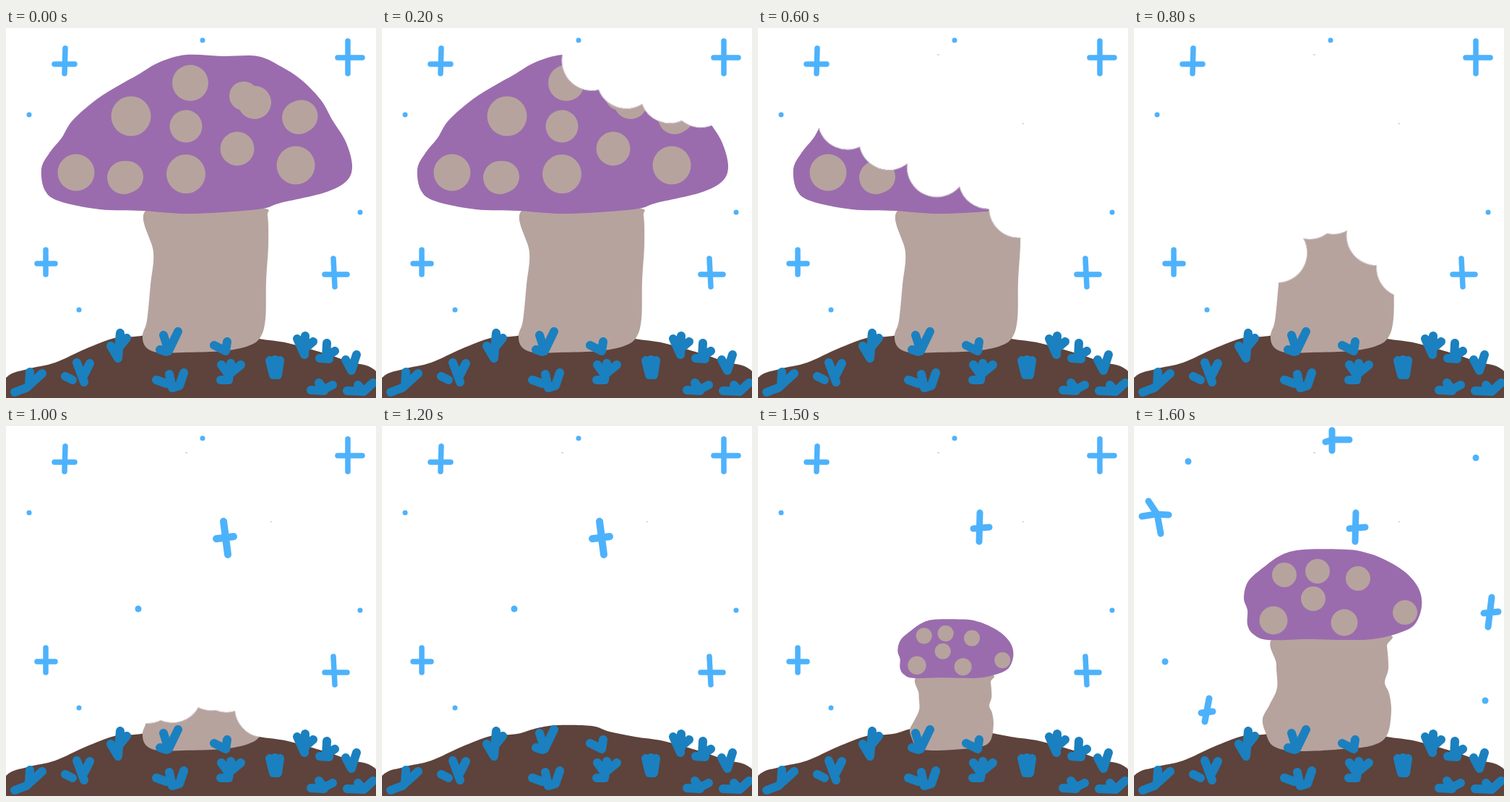
Write an HTML page that moves like this. It is 512x512 px and loops after 1.7 s.

```html
<!DOCTYPE html>
<html lang="en">
<head>
<meta charset="utf-8">
<title>Mushroom</title>
<style>
html, body { margin: 0; width: 100%; height: 100%; overflow: hidden; background: #fff; }
svg { display: block; width: 100vw; height: 100vh; }
.star { stroke: #4db2fc; fill: none; stroke-linecap: round; stroke-linejoin: round; }
.grass { stroke: #1b80bf; fill: none; stroke-width: 12; stroke-linecap: round; stroke-linejoin: round; }
</style>
</head>
<body>
<svg id="stage" viewBox="0 0 512 512">
  <defs><clipPath id="left"><path id="keep"/></clipPath></defs>
</svg>
<script>
const STEP = 100, COUNT = 17;
const CAP = '#9a6cad', FLESH = '#b6a39e', SOIL = '#5d433b';
const stage = document.getElementById('stage');
const keep = document.getElementById('keep');

function add(parent, tag, attrs = {}) {
  const el = document.createElementNS('http://www.w3.org/2000/svg', tag);
  for (const k in attrs) el.setAttribute(k, attrs[k]);
  return parent.appendChild(el);
}

// Smooth closed outline through "x,y x,y ..."
function blob(text) {
  const p = text.split(' ').map(s => s.split(',').map(Number));
  const n = p.length, at = i => p[(i + n) % n];
  let d = 'M' + p[0];
  for (let i = 0; i < n; i++) {
    const [a, b, c, e] = [at(i - 1), at(i), at(i + 1), at(i + 2)];
    const c1 = b.map((v, k) => v + (c[k] - a[k]) / 6);
    const c2 = c.map((v, k) => v - (e[k] - b[k]) / 6);
    d += `C${c1} ${c2} ${c}`;
  }
  return d + 'Z';
}

function mushroom(parent, stem, cap, spots, transform = '') {
  const g = add(parent, 'g', { transform });
  add(g, 'path', { d: blob(stem), fill: FLESH });
  add(g, 'path', { d: blob(cap), fill: CAP });
  for (const [cx, cy, r] of spots) add(g, 'circle', { cx, cy, r, fill: FLESH });
  return g;
}

function stars(lines, dots, width, r) {
  const g = add(stage, 'g', { class: 'star', 'stroke-width': width });
  add(g, 'path', { d: lines });
  for (const [cx, cy] of dots) add(g, 'circle', { cx, cy, r, fill: '#4db2fc', stroke: 'none' });
  return g;
}

// Sky
const sky = {
  a: stars('M82 28L81 63M67 50H95M473 18V63M459 41H493M55 307V341M43 326H68M453 319L455 358M441 341H472',
    [[272, 17], [32, 120], [490, 255], [101, 390]], 7.5, 3.5),
  b: stars('M276 6V39M272 18L276 15M255 27L284 30H317M30 107L26 115V149M13 129L37 130M28 119H31M487 237L486 273M472 256H492L507 262M101 373L106 400M89 397L118 392',
    [[35, 41], [473, 55], [39, 320], [473, 374]], 9.5, 4.6),
  c: stars('M274 6V34M265 22L275 19H298M20 104L32 122L37 149M11 125L30 122L48 123M495 237L490 278M484 259L504 257M104 377L98 409M93 397L109 395',
    [[75, 49], [473, 44], [43, 326], [486, 380]], 9, 4.5),
  x: stars('M301 132L307 178M291 156L315 153', [[183, 253]], 10, 4.5),
  y: stars('M291 128L288 166M277 146H303', [[190, 225]], 9.5, 4.5),
  z: stars('M307 120L306 160M298 142L320 140', [], 9, 4.5)
};
const skyAt = 'a c a c a c a c a c ax by ax ax by az cz'.split(' ');

const crumbs = [
  add(stage, 'path', { d: 'M248 37H251', stroke: '#bbb' }),
  add(stage, 'path', { d: 'M366 132.500H368', stroke: '#bbb' })
];

// Hill
add(stage, 'path', {
  fill: SOIL,
  d: blob('0,484 30,472 68,463 110,444 150,429 178,427 192,425 215,418 243,414 290,415 315,423 350,430 390,436 440,450 475,462 512,475 540,530 -30,530')
});

// Mushrooms
const eaten = add(stage, 'g', { 'clip-path': 'url(#left)' });
mushroom(eaten,
  '193,253 204,310 200,355 195,405 189,425 193,441 210,449 245,449 300,447 335,440 352,428 359,402 360,350 363,300 362,260 355,249 270,240',
  '49,195 60,173 77,152 92,128 125,99 157,79 182,65 213,47 250,37 300,39 348,39 380,53 409,72 436,100 452,128 470,157 479,190 471,212 440,228 380,242 355,250 300,255 245,257 190,253 130,251 75,240 54,225',
  [[97, 200, 25.5], [163, 207, 23], [168, 206, 22], [173, 122, 27.5], [255, 76, 25], [249, 136, 22.5],
   [249, 202, 27], [320, 167, 23.500], [401, 190, 26.5], [405, 124, 23], [409, 122, 22.5], [329, 94, 20], [344, 103, 23]]);
const rim = add(eaten, 'path', { fill: 'none', stroke: '#d9d0d8', 'stroke-width': 1.6 });

const smallParts = [
  '245,394 247,425 255,438 268,442 284,436 289,420 288,395',
  '219,380 226,366 245,351 265,346 290,351 304,368 304,385 292,399 265,401 233,396 222,390',
  [[252, 363, 6.2], [289, 389, 6.5]]
];
const largeParts = [
  '200,290 197,330 198,362 188,385 178,405 182,424 193,443 225,450 290,447 330,442 350,428 356,395 353,370 347,355 352,335 350,305 346,288',
  '152,238 158,215 180,195 205,178 235,171 295,171 320,175 345,184 375,202 394,225 398,250 388,275 365,287 330,295 290,296 240,295 185,296 165,288 157,275 157,255',
  [[208, 206, 17], [254, 201, 17], [310, 211, 17], [248, 239, 17], [193, 269, 19.5], [291, 272, 18.5], [375, 258, 17]]
];
const about = (x, y, s) => `translate(${x} ${y}) scale(${s}) translate(${-x} ${-y})`;
const grown = {
  13: mushroom(stage, ...smallParts, about(268, 440, .5)),
  14: mushroom(stage, ...smallParts),
  15: mushroom(stage, ...largeParts, about(270, 447, .65)),
  16: mushroom(stage, ...largeParts)
};

// Grass
add(stage, 'path', {
  class: 'grass',
  d: 'M12 504L28 498L50 478M33 476L32 493' +
     'M82 482L92 487M98 463L108 490M116 464L108 480' +
     'M145 440L155 457L158 422M167 429L158 440' +
     'M213 445L222 448M218 425L225 447L238 420' +
     'M208 487L222 492M226 479L230 498L240 495L246 477' +
     'M288 439L304 447L306 434' +
     'M297 487H308L311 464M298 466L308 480L325 466' +
     'M365 460L370 480H376L379 460M372 459L373 470' +
     'M403 430L413 452L414 426M425 434L412 445' +
     'M434 457L447 458M444 436L443 455L455 447' +
     'M470 459L478 474L485 452' +
     'M422 501L440 502M433 491L440 500L452 494' +
     'M472 502L495 503L508 491M487 494L495 503'
});

// Bite fronts: a lead-in point, then the tips between the bites
const fronts = [
  '-9,-9 520,-9',
  '275,-9 275,37 335,70 395,67',
  '250,-9 250,37 300,85 360,105 415,128 455,135',
  '250,-9 250,37 288,108 367,132 434,176 473,211',
  '178,-9 178,68 245,97 288,108 367,132 434,176 473,211',
  '178,-9 178,68 225,125 262,180 320,250 362,290',
  '85,-9 85,140 141,164 207,187 279,219 320,250 362,290',
  '-9,290 195,290 234,268 270,275 310,290 362,330',
  '-9,352 201,352 234,291 267,284 295,280 336,328 360,369',
  '-9,378 196,378 235,350 270,335 310,345 357,400',
  '-9,413 193,411 214,407 266,389 290,393 317,394 350,430',
  '-9,432 190,432 240,425 285,422 335,442'
];

function bite(text) {
  const [lead, first, ...tips] = text.split(' ');
  const arcs = 'L' + first + tips.map(t => 'A41 41 0 0 0 ' + t).join('');
  const [, y0] = lead.split(','), y1 = text.split(',').pop();
  keep.setAttribute('d', `M-9 520L-9 ${y0}L${lead}${arcs}L520 ${y1}V520Z`);
  rim.setAttribute('d', 'M' + arcs.slice(1));
}

const show = (el, on) => { el.style.display = on ? '' : 'none'; };
let last = -1;

function draw() {
  const i = Math.floor(performance.now() / STEP) % COUNT;
  if (i !== last) {
    last = i;
    for (const k in sky) show(sky[k], skyAt[i].includes(k));
    for (const k in grown) show(grown[k], +k === i);
    show(eaten, i < fronts.length);
    if (i < fronts.length) bite(fronts[i]);
    show(crumbs[0], i > 2);
    show(crumbs[1], i > 4);
  }
  requestAnimationFrame(draw);
}
draw();
</script>
</body>
</html>
```
